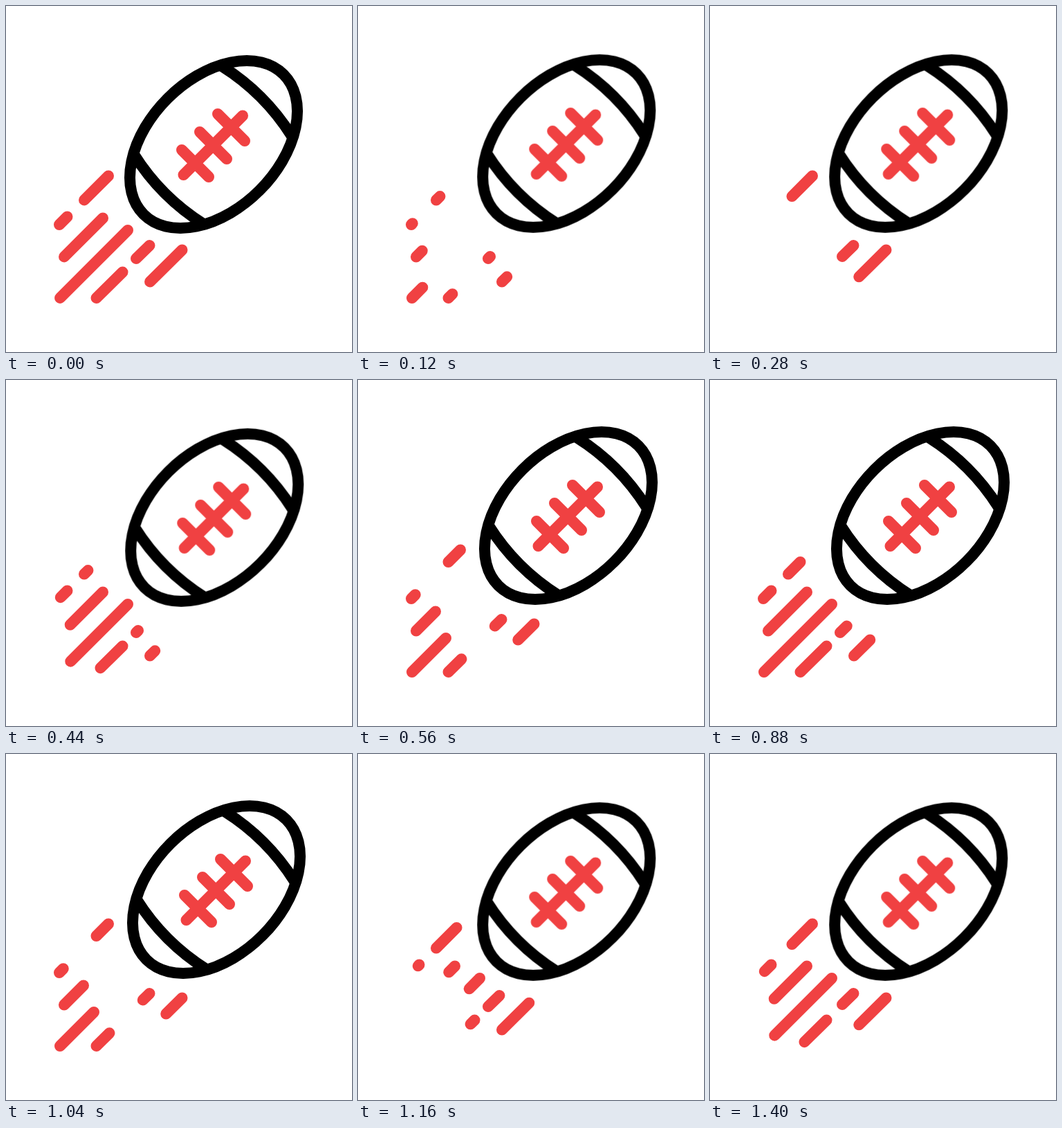
These frames come from a looping animation (500 px wide and 500 px high, 1440 ms). An HTML page without scripts:

```html
<!DOCTYPE html>
<html lang="en">
<head>
<meta charset="utf-8">
<title>Flying football</title>
<style>
html, body { margin: 0; width: 100%; height: 100%; overflow: hidden; background: #fff; }

svg {
  display: block;
  width: 100%;
  height: 100%;
  fill: none;
  stroke: #f04142;
  stroke-width: 16;
  stroke-linecap: round;
  animation: progress 160ms step-end infinite;
}

.outline { stroke: #000; }
.ball { animation: shake 160ms step-end infinite; }

/* Each streak is one dash; its offset is base - dir * p. */
.streaks path {
  stroke-dasharray: 1 3;
  stroke-dashoffset: calc(1px * (var(--base) - var(--dir) * var(--p)));
}
.near { animation: near 1440ms step-end infinite; }
.far { animation: far 1440ms step-end infinite; }

/* Eased progress within one beat; slightly below zero hides the empty dash's cap. */
@keyframes progress {
  0%, 100% { --p: -.001; }
  25% { --p: .156; }
  50% { --p: .5; }
  75% { --p: .844; }
}

@keyframes shake {
  0%, 100% { transform: translate(0, 0); }
  25%, 75% { transform: translate(1.2px, -1.2px); }
  50% { transform: translate(4px, -4px); }
}

/* Nine beats. Erase: 0/1, draw: 1/1, hold: 0/0, hidden: 2/0. */
@keyframes near {
  0%, 22.2222%, 55.5556%, 77.7778%, 100% { --base: 0; --dir: 1; }
  11.1111%, 33.3333%, 66.6667%, 88.8889% { --base: 1; --dir: 1; }
  44.4444% { --base: 0; --dir: 0; }
}

@keyframes far {
  0%, 33.3333%, 66.6667%, 100% { --base: 0; --dir: 1; }
  11.1111% { --base: 2; --dir: 0; }
  22.2222%, 44.4444%, 77.7778%, 88.8889% { --base: 1; --dir: 1; }
  55.5556% { --base: 0; --dir: 0; }
}
</style>
</head>
<body>
<svg viewBox="0 0 500 500">
  <defs>
    <path id="seam" d="M312 87Q374 126 413 188"/>
  </defs>

  <g class="streaks near">
    <path pathLength="1" d="M148 245.5L113 280.5"/>
    <path pathLength="1" d="M207.500 346L188 365"/>
    <path pathLength="1" d="M254.500 352.500L208 398.500"/>
  </g>
  <g class="streaks far">
    <path pathLength="1" d="M88.500 304.500L77 316"/>
    <path pathLength="1" d="M140 306.500L84 362.500"/>
    <path pathLength="1" d="M176 324L78 422"/>
    <path pathLength="1" d="M168.500 384.500L130.500 422"/>
  </g>

  <g class="ball">
    <g class="outline">
      <ellipse cx="300" cy="200" rx="143" ry="94" transform="rotate(-45 300 200)"/>
      <use href="#seam"/>
      <use href="#seam" transform="rotate(180 298.900 201.100)"/>
    </g>
    <path d="M256.500 244L342 158.500M306 156L345 195M280 182L319 221M254 208L293 247"/>
  </g>
</svg>
</body>
</html>
```
